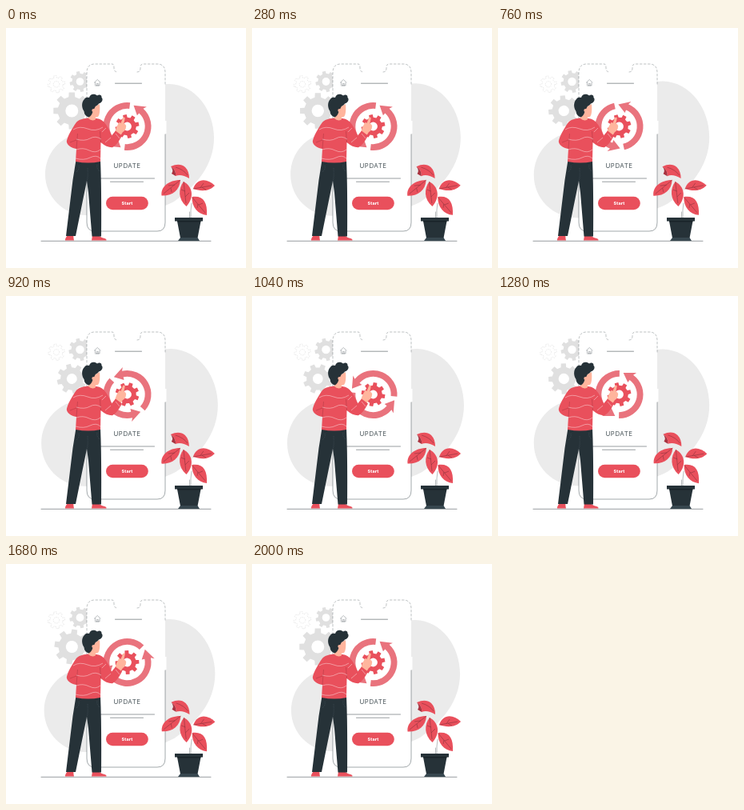
These frames come from a looping animation (300x300 px, 2.04 s). An HTML page:

```html
<!DOCTYPE html>
<html lang="en">
<head>
<meta charset="utf-8">
<title>Update</title>
<style>
  html, body { margin: 0; width: 100%; height: 100%; overflow: hidden; background: #fff; }
  svg { display: block; width: 100%; height: 100%; }
  text { font-family: Inter, "Open Sans", sans-serif; text-anchor: middle; }
  .line { fill: none; stroke: #263238; stroke-width: .6; stroke-linecap: round; stroke-linejoin: round; }
  .red { fill: #e9505c; }
  .dark { fill: #263238; }
  .skin { fill: #ffb59d; }
  .stripe { fill: none; stroke: #fff; stroke-width: .55; opacity: .75; }
  .vein { fill: none; stroke: #7d2c36; stroke-width: .5; }
</style>
</head>
<body>
<svg viewBox="0 0 300 300">
  <path id="blob" fill="#ebebeb" d="M204 70C238 71 260 104 260 137C260 172 237 198 210 217C180 233 140 234 100 234C72 234 49 211 49 183C49 156 69 134 96 131C140 124 155 70 204 70Z"/>

  <path id="bigGear" fill="#e0e0e0" fill-rule="evenodd"/>
  <path id="smallGear" fill="#e0e0e0" fill-rule="evenodd"/>
  <path id="thinGear" fill="none" stroke="#d9d9d9" stroke-width=".6" stroke-dasharray="1.5 1"/>

  <g id="phone">
    <path fill="#fff" d="M111 45H133Q135 45 135 50Q135 55 139 55H164Q168 55 168 50Q168 45 171 45H189Q199 45 199 56V243Q199 254 189 254H111Q101 254 101 243V56Q101 45 111 45Z"/>
    <path fill="#fff" d="M199 116H200.500V132H199Z"/>
    <path class="line" stroke-dasharray="2.5 2.5" style="opacity:.5" d="M101 128V56Q101 45 111 45H133Q135 45 135 50Q135 55 139 55M164 55Q168 55 168 50Q168 45 171 45H189Q199 45 199 56V70"/>
    <path class="line" style="opacity:.7" d="M199 133V243Q199 254 189 254H111Q101 254 101 243V128"/>
    <path class="line" style="opacity:.6" stroke-dasharray="1 1" d="M110.500 68L114.300 64.500L118 68M111.500 68V72H117V68M113.500 72V69.500H115.200V72"/>
    <path class="line" style="opacity:.85" d="M136.500 69.200H169.500"/>
    <path class="line" style="opacity:.8" d="M118 188H185.500M130.500 192.200H171.500"/>
    <text x="151.500" y="174.800" font-size="7.900" letter-spacing=".55" fill="#4a555a">UPDATE</text>
    <rect class="red" x="125" y="210.800" width="52.800" height="16.400" rx="8.200"/>
    <text x="151.500" y="220.700" font-size="5.300" font-weight="800" letter-spacing=".2" fill="#fff">Start</text>
  </g>

  <g id="arrows" fill="#e9737d"></g>
  <path id="midGear" class="red" fill-rule="evenodd"/>

  <path class="line" d="M44 266.300H256" style="opacity:.8"/>

  <g id="man">
    <path class="skin" d="M78.500 256H84.500V262H78.500ZM109 256H116V262H109Z"/>
    <path class="red" d="M77 259L84 260L85 265.500H74Q73.500 263 77 259ZM108 259.500L116 259.500Q120 263 124 263.300Q126 264 125.500 265.500H107Z"/>
    <path class="dark" d="M87.500 165H118Q119.500 200 119 260.500H107.500L103 206L101 191L87 260H75L83.500 190Z"/>
    <path d="M102 175Q103 190 100 193M91 172Q92 177 88 180M114 171Q113 176 117 179" fill="none" stroke="#55646b" stroke-width=".45" stroke-dasharray="1 1"/>
    <path class="skin" d="M136 130Q137.500 124 140.500 119.500Q142 117 143.500 119L146 112.500Q148 110.500 148.700 113L147.300 119.500Q151 121 150 124Q149.500 128 146 130L143.500 134Z"/>
    <path class="red" d="M102 112.500C95 113.500 90 115 87.500 118.500C83 125 77 135 75.800 141.500C76 146 81 150 88 151L87 167Q103 170 118 167L118.500 143Q126 149.500 133 149.200Q138.500 147 145 134.500L137 128.500L132 134.500C129 127 125 119 120 115.500Q117 113 113 113Z"/>
    <path fill="none" stroke="#b53a46" stroke-width=".6" d="M88 151L89.500 132M118.500 143L117.500 129M80 143L88 140"/>
    <path class="stripe" d="M84 127Q92 122 102 126T121 124M88 139Q98 142 105 138T119 139M88 152Q96 149 104 153T118 152M87 163Q97 166 105 162T118 163M125 125L120 130M131 137L124 143M137 132L142 138"/>
    <path class="skin" d="M103 103L117 95Q117.800 103 116.500 108Q115.500 112 112 111.500L111.800 114.500Q107 117 103 113Z"/>
    <path class="dark" d="M97.500 104C94 99 94.500 92 98 89C99 86.500 102 86.500 104 87C105 82 111 81.500 114 84.500C117 82.500 120 84 119.500 87C122 89 120 93.500 116 94.500C114 97.500 112 97 111 99.500L108.500 104.500Q107 110 103.500 111.500Q98 110 97.500 104Z"/>
    <circle class="skin" cx="109.300" cy="103" r="2"/>
  </g>

  <g id="plant">
    <path class="line" style="opacity:.55" d="M229.500 237V230M231 237Q230.500 228 232 219"/>
    <path class="red" d="M206 173Q217 168 224 174Q229 179 229 188Q219 182 212 185Q213 178 206 173Z"/>
    <path fill="#a8323f" d="M206 173Q213 178 212 185L207 182Q210 178 206 173Z"/>
    <path class="red" d="M218 190C217 203 208 210 194.500 209.500C193 199 203 190 218 190Z"/>
    <path class="red" d="M222 192C233 198 236 211 225.500 223C215 214 215 201 222 192Z"/>
    <path class="red" d="M234 201C238 188 251 187 261 197C253 205 243 204 234 201Z"/>
    <path class="red" d="M232.500 211C246 209 252 217 251 234C240 233 232 224 232.500 211Z"/>
    <path class="vein" d="M218 190L197 207M211 196L203 197M206 200L207 205M222 192L225 219M224 204L219 202M224 211L229 206M234 201L257 197M243 199.500L247 194M245 199.300L250 202M233 212L249 231M240 220L239 225M241 221L246 219M212 174Q222 177 227 184"/>
  </g>
  <path class="dark" d="M211 237H246V241.500H243.500L239.500 262.500H218L214 241.500H211Z"/>
  <path d="M214 241.800H243.500" stroke="#10181c" stroke-width=".8"/>
  <path d="M218 262H239.500L242 266H215Z" fill="#37474f"/>
</svg>
<script>
  const LOOP = 2040, STEP = 40;
  const $ = id => document.getElementById(id);
  const polar = (r, deg) => {
    const a = deg * Math.PI / 180;
    return `${(r * Math.cos(a)).toFixed(2)} ${(-r * Math.sin(a)).toFixed(2)}`;
  };
  const circle = r => `M${r} 0A${r} ${r} 0 1 0 ${-r} 0A${r} ${r} 0 1 0 ${r} 0Z`;

  // Eight-toothed wheel around the origin with a round hole.
  function gear(outer, body, hole, turn = 0) {
    const pts = [];
    for (let i = 0; i < 8; i++) {
      const a = turn + i * 45;
      pts.push(polar(body, a - 13), polar(outer, a - 9), polar(outer, a + 9), polar(body, a + 13));
    }
    return `M${pts.join("L")}Z${circle(hole)}`;
  }

  // Curved band ending in a counter-clockwise arrowhead.
  function arrow(turn) {
    const p = (r, a) => polar(r, a + turn);
    return `M${p(30, -97)}A30 30 0 0 0 ${p(30, 48)}L${p(34.5, 45)}L${p(27.5, 73)}` +
      `L${p(18.5, 48)}L${p(22.2, 48)}A22.2 22.2 0 0 1 ${p(22.2, -97)}Z`;
  }

  $("bigGear").setAttribute("d", gear(23.3, 17.8, 8));
  $("smallGear").setAttribute("d", gear(13, 10, 4.8, 12));
  $("thinGear").setAttribute("d", gear(10.8, 8.2, 3.8, 10));
  $("midGear").setAttribute("d", gear(15, 11.3, 5.4, 12));
  $("arrows").innerHTML = [0, 180].map(a => `<path d="${arrow(a)}"/>`).join("");

  // cubic-bezier(.42, 0, .58, 1)
  function easeInOut(x) {
    if (x <= 0) return 0;
    if (x >= 1) return 1;
    let lo = 0, hi = 1, s = .5;
    for (let i = 0; i < 24; i++) {
      s = (lo + hi) / 2;
      const q = 1 - s;
      if (1.26 * s * q * q + 1.74 * s * s * q + s ** 3 < x) lo = s; else hi = s;
    }
    return s * s * (3 - 2 * s);
  }

  const place = (id, x, y, rest) => $(id).setAttribute("transform", `translate(${x} ${y}) ${rest}`);

  function draw(t) {
    const phase = 2 * Math.PI * t / LOOP;
    const pulse = (1 - Math.cos(phase)) / 2;
    const turn = easeInOut((t - 515) / 1500);
    place("blob", 154.5, 155, `scale(${1 + .047 * pulse}) translate(-154.5 -155)`);
    place("bigGear", 82.3, 103.5, `rotate(${-90 * turn}) scale(${1 - .2 * pulse})`);
    place("smallGear", 92.5, 67, `scale(${1 + .1 * pulse})`);
    place("thinGear", 63, 70.3, `scale(${1 - .05 * pulse})`);
    place("arrows", 151.5, 123, `rotate(${-360 * turn})`);
    place("midGear", 151.5, 123, `rotate(${-90 * turn})`);
    $("plant").setAttribute("transform", `rotate(${-.6 * Math.sin(phase)} 229 236)`);
  }

  const start = performance.now();
  function tick() {
    const t = (performance.now() - start) % LOOP;
    draw(Math.floor(t / STEP) * STEP);
    requestAnimationFrame(tick);
  }
  tick();
</script>
</body>
</html>
```
